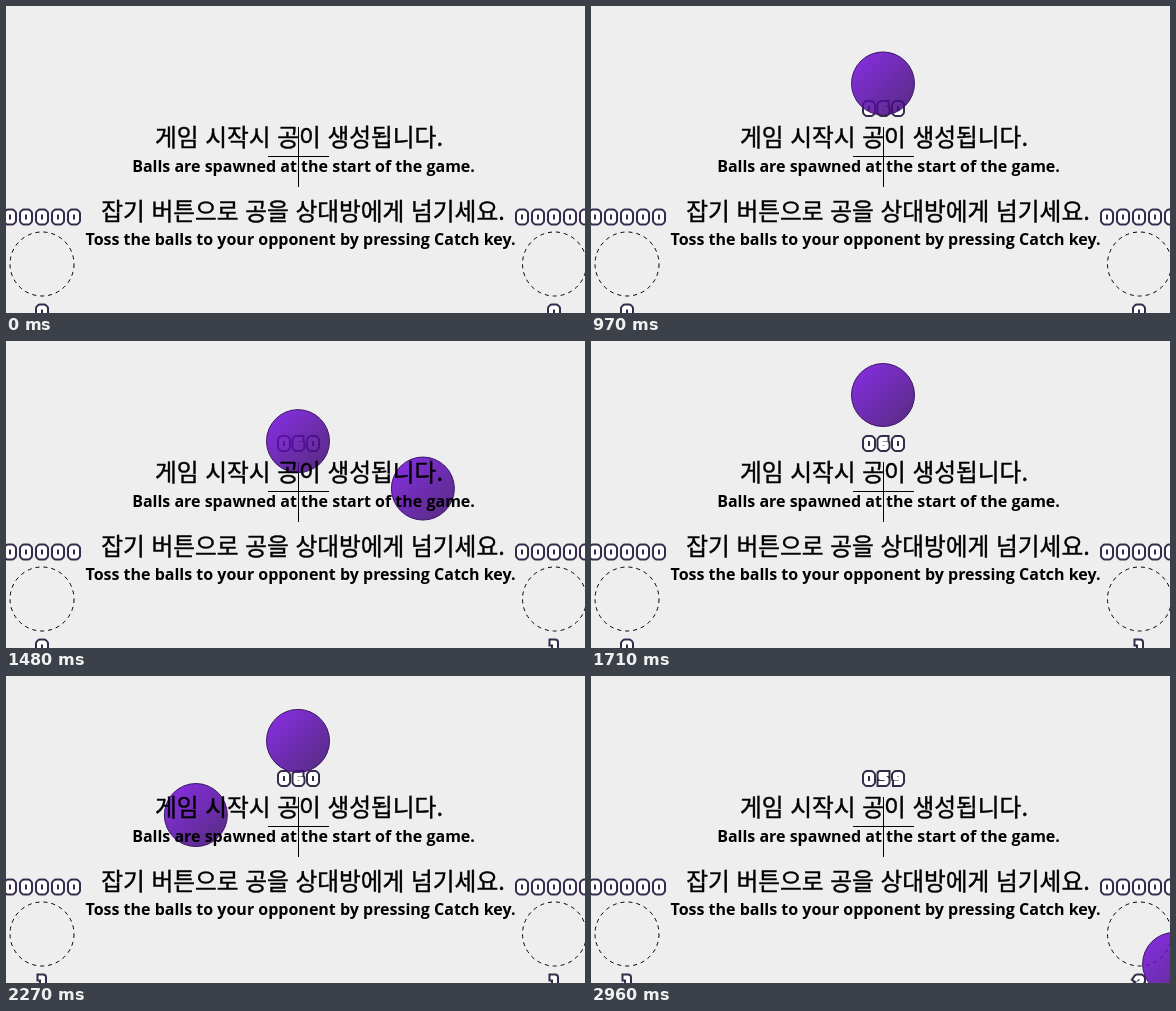
An HTML page for the animation above (3010 ms loop, 579 by 307 pixels).

```html
<!DOCTYPE html>
<html lang="ko">
<head>
<meta charset="utf-8">
<title>Ball toss tutorial</title>
<style>
  html, body { margin: 0; width: 100%; height: 100%; overflow: hidden; background: #eee; }
  svg { display: block; width: 579px; height: 307px; }
  text { text-anchor: middle; fill: #000; }
  .ko { font: 500 23.7px "Noto Sans CJK KR", "Noto Sans CJK", sans-serif; stroke: #000; stroke-width: 0.4; }
  .en { font: 700 16px "Open Sans", "Noto Sans", sans-serif; }
  .hand { fill: none; stroke: #000; stroke-dasharray: 4 4; }
  .cross { stroke: #000; shape-rendering: crispEdges; }
  .ball { fill: url(#shade); fill-opacity: 0.85; stroke: #3c1768; }
  .digits { fill: none; stroke-linejoin: round; stroke-linecap: square; }
  .edge { stroke: #342c4a; stroke-width: 8; }
  .face { stroke: #fff; stroke-width: 4; }
</style>
</head>
<body>
<svg viewBox="0 0 579 307">
  <defs>
    <linearGradient id="shade" x1="0.15" y1="0.15" x2="0.85" y2="0.85">
      <stop offset="0" stop-color="#6f0cd4"/>
      <stop offset="1" stop-color="#420a7b"/>
    </linearGradient>
  </defs>
  <rect width="579" height="307" fill="#eee"/>
  <circle class="hand" cx="36" cy="258" r="32"/>
  <circle class="hand" cx="548.5" cy="258" r="32"/>
  <path class="cross" d="M292.5 121V181M262 150.5H323"/>
  <g id="scores" class="digits"></g>
  <g id="balls"></g>
  <text class="ko" x="293" y="140">게임 시작시 공이 생성됩니다.</text>
  <text class="en" x="297.5" y="166">Balls are spawned at the start of the game.</text>
  <text class="ko" x="297" y="214">잡기 버튼으로 공을 상대방에게 넘기세요.</text>
  <text class="en" x="294.5" y="239">Toss the balls to your opponent by pressing Catch key.</text>
</svg>
<script>
const LOOP = 3010, START = 640, STEP = 46.36;
const SPAWN_Y = 150, TOP_Y = 42, CENTER_X = 292, RISE = 0.199;

const glyphs = {
  0: "M1 0H5L6 1V8L5 9H1L0 8V1Z",
  1: "M1.5 0H4V9",
  2: "M0 1.5L1 0H5L6 1V3.5L0 7.5V9H6",
  5: "M6 0H0V4H5L6 5V8L5 9H0",
  6: "M5 0H1L0 1V8L1 9H5L6 8V4.5H0",
  9: "M1 9H5L6 8V1L5 0H1L0 1V4.5H6"
};

const balls = [
  { spawn: 600, toss: 1154, side: 1, pace: 1, slope: 0.845 },
  { spawn: 1224, toss: 1880, side: -1, pace: 0.586, slope: 0.95 },
  { spawn: 1835, toss: 2457, side: 1, pace: 1, slope: 0.845 }
];

const scoreLayer = document.getElementById("scores");
const ballLayer = document.getElementById("balls");

function digits(value, x, y, pitch) {
  return [...value].map((ch, i) => {
    const left = x + (i - (value.length - 1) / 2) * pitch - 3;
    const path = kind => `<path class="${kind}" d="${glyphs[ch]}"/>`;
    return `<g transform="translate(${left} ${y - 4.5})">${path("edge")}${path("face")}</g>`;
  }).join("");
}

// Balls rise from the middle, wait, then speed off towards one side.
function drawBall(ball, t) {
  if (t < ball.spawn) return "";
  const u = Math.max(0, t - ball.toss);
  const reach = ball.pace * (0.05 * u + 0.00106 * u * u);
  const x = CENTER_X + ball.side * reach;
  const y = Math.max(TOP_Y, SPAWN_Y - RISE * (t - ball.spawn)) + ball.slope * reach;
  return `<circle class="ball" cx="${x}" cy="${y}" r="31.5"/>`;
}

function render(now) {
  const t = now < START ? 0 : START + Math.floor((now - START) / STEP) * STEP;
  const tossed = side => String(balls.filter(b => b.side === side && t >= b.toss).length);
  const timer = t < START ? "" : t < 2480 ? "060" : "059";
  scoreLayer.innerHTML =
    digits("00000", 36, 211, 16) + digits("00000", 548, 211, 16) +
    digits(tossed(-1), 36, 306, 16) + digits(tossed(1), 548, 306, 16) +
    digits(timer, 292.5, 102.5, 14.5);
  ballLayer.innerHTML = balls.map(b => drawBall(b, t)).join("");
}

const origin = performance.now();
function tick() {
  render((performance.now() - origin) % LOOP);
  requestAnimationFrame(tick);
}
tick();
</script>
</body>
</html>
```
